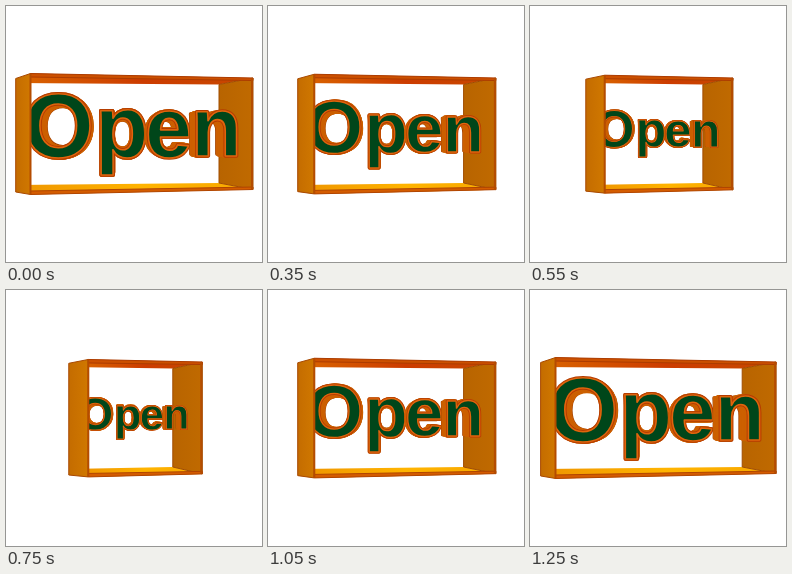
An HTML page with a canvas that plays this animation: 256 px wide and 256 px high, repeating every 1300 ms.

```html
<!DOCTYPE html>
<html lang="en">
<head>
<meta charset="utf-8">
<title>Open sign</title>
<style>
html, body { margin: 0; height: 100%; overflow: hidden; background: #fff; }
canvas { display: block; width: 100vw; height: 100vh; }
</style>
</head>
<body>
<canvas id="stage" width="256" height="256"></canvas>
<script>
const ctx = document.getElementById('stage').getContext('2d');
const LOOP = 1300, HOLD = 150, STEP = 50, MID = 128;
const VANISH_X = 112, DEPTH = 0.08, LAYERS = 12;

// glyph, left origin, baseline, size
const LETTERS = [
  ['O', 17, 151.3, 91],
  ['p', 89, 151, 87.5],
  ['e', 139, 150.5, 84.5],
  ['n', 185.3, 150, 82.5]
];

function poly(points, fill, line) {
  ctx.beginPath();
  points.forEach(p => ctx.lineTo(p[0], p[1]));
  ctx.closePath();
  ctx.fillStyle = fill;
  ctx.fill();
  if (line) {
    ctx.strokeStyle = line;
    ctx.lineWidth = 1;
    ctx.stroke();
  }
}

function blend(x0, x1, ...colors) {
  const g = ctx.createLinearGradient(x0, 0, x1, 0);
  colors.forEach((c, i) => g.addColorStop(i / (colors.length - 1), c));
  return g;
}

// layers shrink towards the vanishing point
function drawLetter([glyph, x, y, size]) {
  ctx.font = `bold ${size}px "Liberation Sans", Arial, sans-serif`;
  for (let i = LAYERS; i >= 0; i--) {
    const z = 1 - DEPTH * i / LAYERS;
    ctx.save();
    ctx.translate(VANISH_X + (x - VANISH_X) * z, MID + (y - MID) * z);
    ctx.scale(z, z);
    ctx.lineWidth = 3.6;
    ctx.strokeStyle = i === LAYERS ? '#a04000' : i ? '#cc6000' : '#b43c00';
    ctx.strokeText(glyph, 0, 0);
    ctx.restore();
  }
  ctx.fillStyle = '#00461a';
  ctx.fillText(glyph, x, y);
  ctx.lineWidth = 1.6;
  ctx.strokeStyle = '#e0640c';
  ctx.strokeText(glyph, x, y);
}

function draw(t) {
  const k = t < HOLD ? 0 : Math.floor((t - HOLD) / STEP) + 1;
  const u = 1 - Math.cos(Math.PI * k / 12);   // 0 wide, 2 narrow
  const nearL = 24.5 + 29.4 * u, farL = 9.7 + 27 * u;
  const nearR = 247 - 25.8 * u, farR = 213 - 23.5 * u;
  const topL = 67.5 + u, botL = 188.5 - 0.8 * u;
  const topR = 72, botR = 183.5 + 0.2 * u;
  const rim = 2.5;

  ctx.clearRect(0, 0, 256, 256);
  ctx.lineJoin = 'round';

  // inside of the box
  poly([[nearL, topL], [nearR, topR], [farR, 78.5], [farL, 77]],
    blend(nearL, nearR, '#d86000', '#cc3c00', '#c84800'));
  poly([[nearL, botL], [nearR, botR], [farR, 177], [farL, 179]],
    blend(nearL, nearR, '#f09800', '#ffb400', '#f8a800'));
  poly([[farR, 78.5], [nearR, topR], [nearR, botR], [farR, 177]],
    blend(farR, nearR, '#b86400', '#c06a00'), '#a04c00');

  const s = 1 - 0.247 * u;
  ctx.save();
  ctx.translate(MID, MID);
  ctx.scale(s, s);
  ctx.translate(-MID, -MID);
  LETTERS.forEach(drawLetter);
  ctx.restore();

  // outer side and front rim
  poly([[farL, 72.5 + 0.4 * u], [nearL, topL], [nearL, botL], [farL, 186 - 0.5 * u]],
    blend(farL, nearL, '#c46c00', '#d07800'), '#a84800');
  poly([[nearL, topL], [nearR, topR], [nearR, topR + rim], [nearL, topL + rim + 1]], '#cc5000', '#ac3c00');
  poly([[nearL, botL], [nearR, botR], [nearR, botR - rim], [nearL, botL - rim - 1]], '#d45c00', '#b04400');
  poly([[nearL - 1, topL], [nearL + 1, topL], [nearL + 1, botL], [nearL - 1, botL]], '#b44c00');
  poly([[nearR - 2, topR], [nearR, topR], [nearR, botR], [nearR - 2, botR]], '#b44c00');
}

const start = performance.now();
function tick() {
  draw((performance.now() - start) % LOOP);
  requestAnimationFrame(tick);
}
tick();
</script>
</body>
</html>
```
